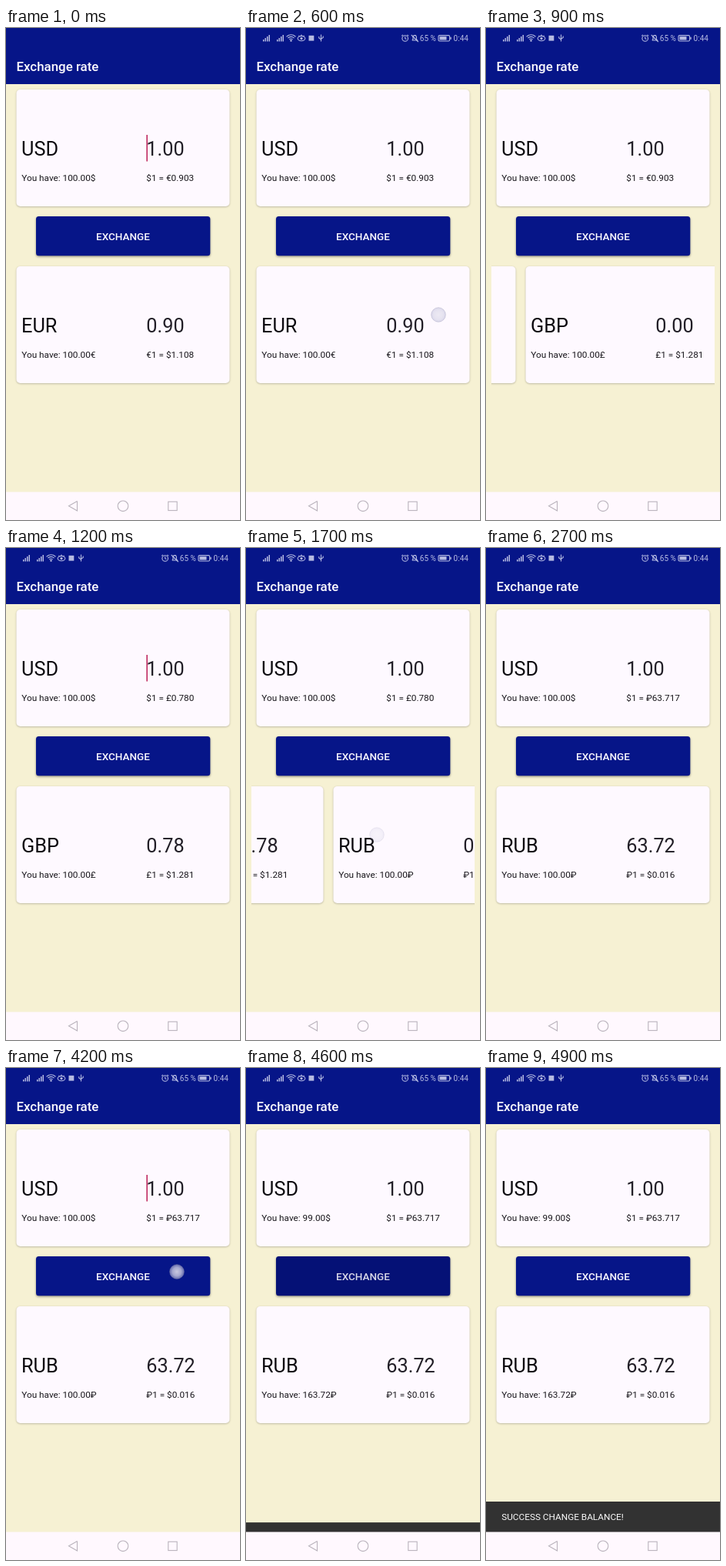
Recreate the animation shown at these times as an HTML page with a canvas. Size 304 by 640 pixels, loop 5 s.

```html
<!DOCTYPE html>
<html lang="en">
<head>
<meta charset="utf-8">
<title>Exchange rate</title>
<style>
html, body { margin: 0; width: 100%; height: 100%; overflow: hidden; background: #f6f1d3; }
canvas { display: block; width: 304px; height: 640px; }
</style>
</head>
<body>
<canvas id="stage"></canvas>
<script>
const W = 304, H = 640, LOOP = 5000, STEP = 100, PITCH = 290;
const BLUE = '#061588', SAND = '#f6f1d3', PAPER = '#fef9ff', ICON = '#b6bbe2';
const canvas = document.getElementById('stage');
const ctx = canvas.getContext('2d');
const dpr = window.devicePixelRatio || 1;
canvas.width = W * dpr;
canvas.height = H * dpr;

const clamp = x => Math.max(0, Math.min(1, x));
const span = (t, a, b) => clamp((t - a) / (b - a));
const within = (t, a, b) => t >= a && t < b;

function text(str, x, y, size, color, weight = 400) {
  ctx.font = `${weight} ${size}px Roboto, sans-serif`;
  ctx.fillStyle = color;
  ctx.fillText(str, x, y);
}

function rect(x, y, w, h, color) {
  ctx.fillStyle = color;
  ctx.fillRect(x, y, w, h);
}

function box(x, y, w, h, r, color, shade, blur, drop) {
  ctx.save();
  ctx.shadowColor = `rgba(0,0,0,${shade})`;
  ctx.shadowBlur = blur * dpr;
  ctx.shadowOffsetY = drop * dpr;
  ctx.fillStyle = color;
  ctx.beginPath();
  ctx.roundRect(x, y, w, h, r);
  ctx.fill();
  ctx.restore();
}

// Strokes a polyline given as x, y pairs.
function line(...p) {
  ctx.beginPath();
  for (let i = 0; i < p.length; i += 2) ctx.lineTo(p[i], p[i + 1]);
  ctx.stroke();
}

function arc(x, y, r, a = 0, b = Math.PI * 2) {
  ctx.beginPath();
  ctx.arc(x, y, r, a, b);
}

// Ease with control points (.4, 0) and (.2, 1).
function standardEase(x) {
  let lo = 0, hi = 1;
  for (let i = 0; i < 20; i++) {
    const s = (lo + hi) / 2, q = 1 - s;
    if (1.2 * q * q * s + 0.6 * q * s * s + s ** 3 < x) lo = s; else hi = s;
  }
  return 3 * (1 - lo) * lo * lo + lo ** 3;
}

// Finger drag over the first part, then a fling that settles.
function swipe(t, start, release) {
  const drag = 60 * span(t, start, release);
  const fling = 1 - (1 - span(t, release, release + 430)) ** 5;
  return drag + (PITCH - 60) * fling;
}

function card(x, y, c) {
  box(x + 13.5, y, 277, 152, 5, PAPER, 0.26, 2.5, 0.8);
  text(c.code, x + 20, y + 86.3, 25.3, '#0c0a0f');
  text(c.amount, x + 182.3, y + 86.3, 25.3, '#221f27');
  text('You have: ' + c.have, x + 20.2, y + 119, 11.8, '#19171c');
  text(c.rate, x + 182.3, y + 119, 11.8, '#19171c');
}

function signal(x) {
  for (let i = 0; i < 4; i++) rect(x + i * 2.5, 15 - i * 2, 1.5, 2.5 + i * 2, ICON);
}

function statusBar(alpha) {
  if (!alpha) return;
  ctx.save();
  ctx.globalAlpha = alpha;
  ctx.strokeStyle = ICON;
  ctx.lineWidth = 1.1;
  signal(22);
  signal(40);
  for (const r of [3, 5.6, 8.2]) {
    arc(58.5, 17, r, -Math.PI * 0.76, -Math.PI * 0.24);
    ctx.stroke();
  }
  ctx.fillStyle = ICON;
  arc(58.5, 16.5, 1.2);
  ctx.fill();

  ctx.beginPath();
  ctx.ellipse(72, 13.6, 4.8, 3.2, 0, 0, Math.PI * 2);
  ctx.stroke();
  arc(72, 13.6, 1.6);
  ctx.fill();
  line(68.5, 9.8, 69.3, 11);
  line(72, 8.6, 72, 10);
  line(75.5, 9.8, 74.7, 11);

  rect(81.5, 9.8, 6.8, 6.8, ICON);

  line(97.5, 8.5, 97.5, 17.5);
  line(94.8, 11, 94.8, 13, 97.5, 15);
  line(100.2, 10.5, 100.2, 12.5, 97.5, 14.3);

  arc(206.7, 13.5, 3.8);
  ctx.stroke();
  line(206.7, 11.2, 206.7, 13.7, 208.4, 14.6);
  line(202.2, 10.4, 204, 8.8);
  line(209.4, 8.8, 211.2, 10.4);

  line(215.8, 16, 217, 14.5, 217, 11.5, 218.2, 9.6, 220.4, 9.6, 221.4, 11.5, 221.4, 14.5, 222.6, 16, 215.8, 16);
  line(214.8, 9, 223.8, 18);

  text('65 %', 225.8, 16.8, 10, ICON);
  ctx.beginPath();
  ctx.roundRect(250, 9.6, 14.6, 7.4, 1.5);
  ctx.stroke();
  rect(251.5, 11.1, 9, 4.4, ICON);
  rect(265.3, 11.8, 1.4, 3, ICON);
  text('0:44', 269.6, 16.8, 10, ICON);
  ctx.restore();
}

function navBar() {
  rect(0, 603.5, W, 36.5, '#fff8fe');
  ctx.strokeStyle = '#b9b3bc';
  ctx.lineWidth = 1.1;
  line(92.5, 615.5, 81.5, 621.8, 92.5, 628, 92.5, 615.5);
  arc(152, 621.8, 6.8);
  ctx.stroke();
  ctx.strokeRect(210.8, 616.2, 11.4, 11.4);
}

function touch(x, y, alpha) {
  if (alpha <= 0) return;
  ctx.save();
  ctx.globalAlpha = alpha;
  const g = ctx.createRadialGradient(x, y, 0, x, y, 9.5);
  g.addColorStop(0, 'rgba(222,220,234,.9)');
  g.addColorStop(0.6, 'rgba(205,204,224,.8)');
  g.addColorStop(1, 'rgba(165,166,205,.6)');
  ctx.fillStyle = g;
  arc(x, y, 9.3);
  ctx.fill();
  ctx.strokeStyle = 'rgba(130,130,165,.6)';
  ctx.lineWidth = 0.9;
  ctx.stroke();
  ctx.restore();
}

function swipeTouch(t, start) {
  if (!within(t, start, start + 300)) return;
  const k = (t - start) / 200;
  touch(250 - 80 * (1 - (1 - clamp(k)) ** 2), 373, k < 1 ? 0.6 : 0.25);
}

function snackbar(t) {
  const k = standardEase(span(t, 4530, 4780));
  if (!k) return;
  const y = 603.5 - 39.5 * k;
  rect(0, y, W, 40, '#323232');
  ctx.globalAlpha = span(t, 4600, 4790);
  text('SUCCESS CHANGE BALANCE!', 20.2, y + 24, 11.8, '#fbfbfb');
  ctx.globalAlpha = 1;
}

const blinks = [[0, 500], [1000, 1500], [1800, 2100], [3000, 3600], [4200, 4500]];

function draw(t) {
  const paid = t >= 4400;
  const page = t < 1200 ? 0 : t < 2000 ? 1 : 2;
  const wallets = [
    { code: 'EUR', amount: '0.90', have: '100.00€', rate: '€1 = $1.108' },
    { code: 'GBP', amount: page > 0 ? '0.78' : '0.00', have: '100.00£', rate: '£1 = $1.281' },
    { code: 'RUB', amount: page > 1 ? '63.72' : '0.00', have: paid ? '163.72₽' : '100.00₽', rate: '₽1 = $0.016' }
  ];

  ctx.setTransform(dpr, 0, 0, dpr, 0, 0);
  rect(0, 0, W, H, SAND);
  rect(0, 0, W, 73, BLUE);
  statusBar(span(t, 0, 300));
  text('Exchange rate', 13.4, 55.6, 16.9, '#fdfbff', 500);

  card(0, 80, {
    code: 'USD', amount: '1.00', have: paid ? '99.00$' : '100.00$',
    rate: '$1 = ' + ['€0.903', '£0.780', '₽63.717'][page]
  });
  if (blinks.some(([a, b]) => within(t, a, b))) rect(182.4, 139, 1.6, 34.5, '#c02c62');

  const pressed = within(t, 4300, 4800);
  box(39, 245, 226.3, 51.3, 3.5, pressed ? '#051176' : BLUE, 0.4, 3, 1.2);
  text('EXCHANGE', 117, 276, 13.5, pressed ? '#d9d8e8' : '#fbf9ff', 500);

  ctx.save();
  ctx.beginPath();
  ctx.rect(7, 303, PITCH, 166);
  ctx.clip();
  const scroll = swipe(t, 620, 770) + swipe(t, 1480, 1634);
  wallets.forEach((c, i) => {
    const x = i * PITCH - scroll;
    if (Math.abs(x) < PITCH) card(x, 310, c);
  });
  ctx.restore();

  swipeTouch(t, 600);
  swipeTouch(t, 1500);
  if (t >= 4200) touch(222, 265, t < 4300 ? 1 : 1 - span(t, 4200, 4500));
  snackbar(t);
  navBar();
}

const origin = performance.now();
function tick() {
  const t = (performance.now() - origin) % LOOP;
  draw(Math.floor(t / STEP) * STEP);
  requestAnimationFrame(tick);
}
tick();
</script>
</body>
</html>
```
